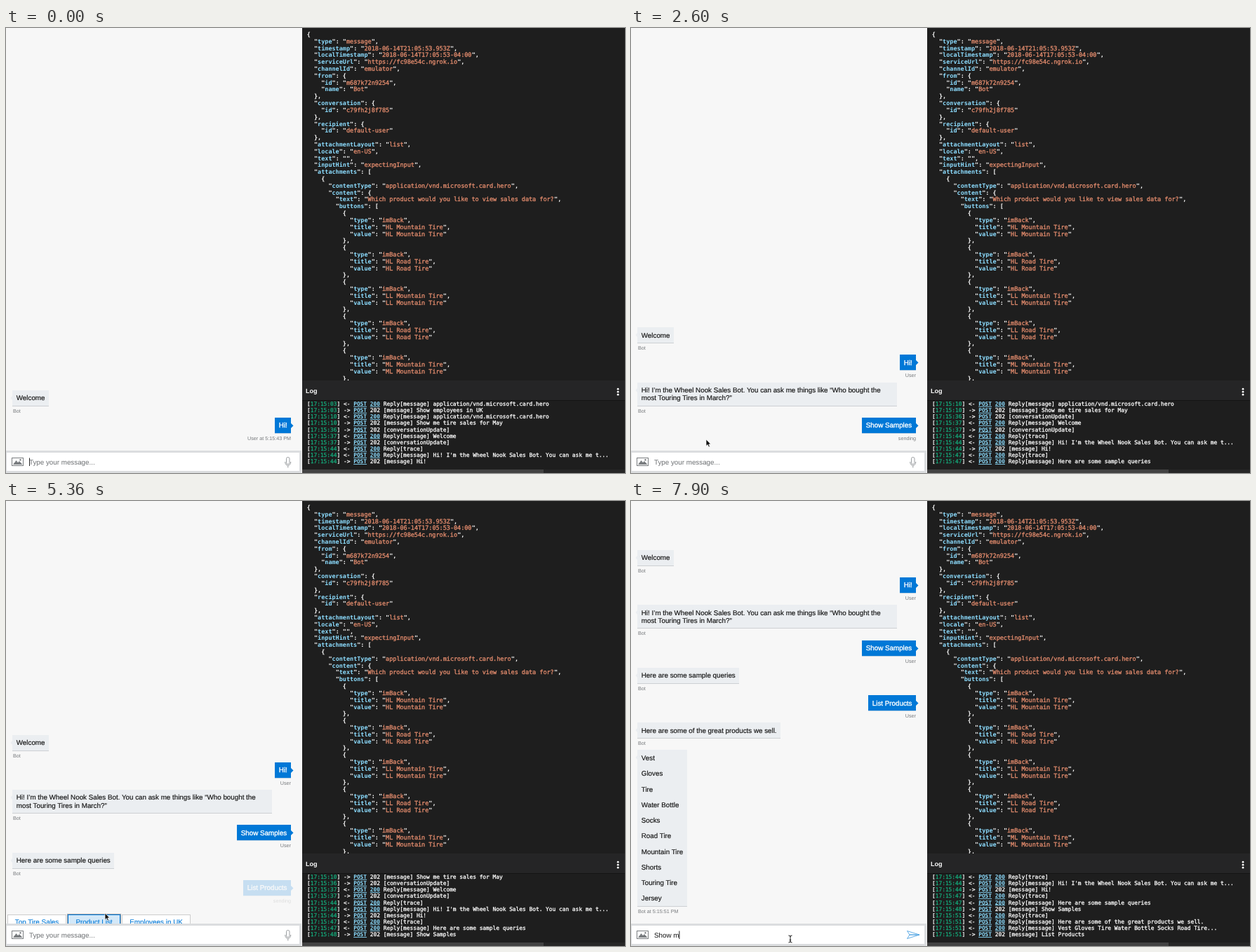
Write an HTML page with a canvas that moves like this. It is 882x635 px and loops after 8 s.

```html
<!DOCTYPE html>
<html lang="en">
<head>
<meta charset="utf-8">
<title>Bot chat</title>
<style>
html, body { margin: 0; width: 100%; height: 100%; overflow: hidden; background: #1e1e1e; }
canvas { display: block; width: 882px; height: 635px; }
</style>
</head>
<body>
<canvas id="stage"></canvas>
<script>
const W = 882, H = 635, LOOP = 8000;
const SANS = '"Liberation Sans", Arial, sans-serif';
const MONO = '"DejaVu Sans Mono", Menlo, monospace';
const BLUE = '#0078d7', PAPER = '#f7f7f7';
const canvas = document.getElementById('stage');
const ctx = canvas.getContext('2d');
const dpr = window.devicePixelRatio || 1;
canvas.width = W * dpr;
canvas.height = H * dpr;
ctx.textRendering = 'geometricPrecision';

const bursts = [
  [0, 0, 1], [120, 120, 1], [390, 500, 2], [650, 650, 1], [1130, 1840, 7], [1960, 2190, 3],
  [2340, 2450, 2], [2600, 2720, 2], [3200, 3440, 3], [3590, 3710, 2], [4060, 4770, 7],
  [4890, 5480, 6], [5630, 5740, 2], [5890, 6590, 7], [7070, 7310, 3], [7550, 7670, 2], [7900, 7900, 1]
];
const ticks = bursts.flatMap(([a, b, n]) =>
  Array.from({ length: n }, (_, i) => Math.round((a + (n > 1 ? (b - a) * i / (n - 1) : 0)) / 10) * 10));

const clamp = v => Math.max(0, Math.min(1, v));
const ease = p => p < 0.5 ? 2 * p * p : 1 - 2 * (1 - p) * (1 - p);
const ramp = (t, start, dur = 350) => clamp((t - start) / dur);

const products = ['Vest', 'Gloves', 'Tire', 'Water Bottle', 'Socks', 'Road Tire',
  'Mountain Tire', 'Shorts', 'Touring Tire', 'Jersey'];

const messages = [
  { who: 'Bot', lines: ['Welcome'], at: -1, fade: -999 },
  { who: 'User', lines: ['Hi!'], at: -1, fade: -999, stamp: '5:15:43 PM' },
  { who: 'Bot', at: 390, fade: 240, width: 370, stamp: '5:15:44 PM',
    lines: ['Hi! I’m the Wheel Nook Sales Bot. You can ask me things like “Who bought the',
      'most Touring Tires in March?”'] },
  { who: 'User', lines: ['Show Samples'], at: 1960, fade: 2059, sent: 2720, stamp: '5:15:47 PM' },
  { who: 'Bot', lines: ['Here are some sample queries'], at: 3200, fade: 3270, stamp: '5:15:47 PM' },
  { who: 'User', lines: ['List Products'], at: 5250, fade: 5290, sent: 6480, stamp: '5:15:51 PM' },
  { who: 'Bot', lines: ['Here are some of the great products we sell.'], at: 6120, fade: 6217 },
  { who: 'Bot', lines: products, gap: 22.28, at: 6120, fade: 6217, stamp: '5:15:51 PM' }
];

const log = [
  ['03', 'Reply[message] application/vnd.microsoft.card.hero'],
  ['03', '[message] Show employees in UK'],
  ['10', 'Reply[message] application/vnd.microsoft.card.hero'],
  ['10', '[message] Show me tire sales for May'],
  ['36', '[conversationUpdate]'],
  ['37', 'Reply[message] Welcome'],
  ['37', '[conversationUpdate]'],
  ['44', 'Reply[trace]'],
  ['44', "Reply[message] Hi! I'm the Wheel Nook Sales Bot. You can ask me t..."],
  ['44', '[message] Hi!'],
  ['47', 'Reply[trace]'],
  ['47', 'Reply[message] Here are some sample queries'],
  ['48', '[message] Show Samples'],
  ['51', 'Reply[trace]'],
  ['51', 'Reply[message] Here are some of the great products we sell.'],
  ['51', 'Reply[message] Vest Gloves Tire Water Bottle Socks Road Tire...'],
  ['51', '[message] List Products']
];

const imBack = name => ({ type: 'imBack', title: name, value: name });
const activity = {
  type: 'message',
  timestamp: '2018-06-14T21:05:53.953Z',
  localTimestamp: '2018-06-14T17:05:53-04:00',
  serviceUrl: 'https://fc98e54c.ngrok.io',
  channelId: 'emulator',
  from: { id: 'm687k72n9254', name: 'Bot' },
  conversation: { id: 'c79fh2j8f785' },
  recipient: { id: 'default-user' },
  attachmentLayout: 'list',
  locale: 'en-US',
  text: '',
  inputHint: 'expectingInput',
  attachments: [{
    contentType: 'application/vnd.microsoft.card.hero',
    content: {
      text: 'Which product would you like to view sales data for?',
      buttons: ['HL Mountain Tire', 'HL Road Tire', 'LL Mountain Tire', 'LL Road Tire',
        'ML Mountain Tire', 'ML Road Tire'].map(imBack)
    }
  }]
};
const jsonLines = JSON.stringify(activity, null, 2).split('\n').slice(0, 51);

// Last entry whose time has been reached
const latest = (list, t) => list.reduce((v, [at, val]) => t >= at ? val : v, list[0][1]);

// Fade a six-digit hex colour in from the chat background
function fadeIn(color, p) {
  const channels = c => [1, 3, 5].map(i => parseInt(c.slice(i, i + 2), 16));
  const from = channels(PAPER);
  return `rgb(${channels(color).map((v, i) => Math.round(from[i] + (v - from[i]) * p))})`;
}

function rect(x, y, w, h, color) {
  ctx.fillStyle = color;
  ctx.fillRect(x, y, w, h);
}

function text(str, x, y, size, color, { font = SANS, weight = '', align = 'left', thick = 0 } = {}) {
  const base = y + size * 0.355;
  ctx.font = `${weight} ${size}px ${font}`;
  ctx.textAlign = align;
  ctx.fillStyle = color;
  ctx.fillText(str, x, base);
  if (thick) {
    ctx.strokeStyle = color;
    ctx.lineWidth = thick;
    ctx.strokeText(str, x, base);
  }
}

function poly(points, fill, stroke, width = 1) {
  ctx.beginPath();
  points.forEach(([x, y]) => ctx.lineTo(x, y));
  ctx.closePath();
  if (fill) { ctx.fillStyle = fill; ctx.fill(); }
  if (stroke) { ctx.strokeStyle = stroke; ctx.lineWidth = width; ctx.stroke(); }
}

function clipped(x, y, w, h, draw) {
  ctx.save();
  ctx.beginPath();
  ctx.rect(x, y, w, h);
  ctx.clip();
  draw();
  ctx.restore();
}

function drawJson() {
  const cw = 5.105, size = 8.48;
  const put = (s, col, y, color, weight) =>
    text(s, 428.8 + col * cw, y, size, color, { font: MONO, weight, thick: weight ? 0 : 0.35 });
  jsonLines.forEach((line, i) => {
    const y = 9 + i * 9.81;
    for (const m of line.matchAll(/"([^"]*)"(:?)|[^"\s]+/g)) {
      if (m[1] === undefined) { put(m[0], m.index, y, '#fff', 'bold'); continue; }
      const end = m.index + m[1].length + 1;
      put('"', m.index, y, '#fff', 'bold');
      put(m[1], m.index + 1, y, m[2] ? '#8cdcfe' : '#e08a6c', m[2] ? 'bold' : '');
      put('"' + m[2], end, y, '#fff', 'bold');
    }
  });
}

function drawLog(t) {
  const cw = 4.726, size = 7.85;
  const count = latest([[0, 10], [2600, 12], [2720, 13], [6010, 14], [6120, 16], [6480, 17]], t);
  log.slice(count - 10, count).forEach(([sec, body], i) => {
    const y = 536.2 + i * 9.13, reply = body.startsWith('Reply');
    const put = (s, col, color, weight) =>
      text(s, 429 + col * cw, y, size, color, { font: MONO, weight, thick: weight ? 0 : 0.3 });
    const link = (s, col) => {
      put(s, col, '#8cdcfe', 'bold');
      rect(429 + col * cw, y + 3.6, s.length * cw, 0.9, '#8cdcfe');
    };
    put('[', 0, '#fff', 'bold');
    put('17:15:' + sec, 1, '#14a879');
    put(']', 9, '#fff', 'bold');
    put(reply ? '<-' : '->', 11, '#fff');
    link('POST', 14);
    if (reply) link('200', 19); else put('202', 19, '#fff');
    put(body, 23, '#fff');
  });
}

function drawPanel(t) {
  rect(422, 0, 460, H, '#1e1e1e');
  clipped(422, 0, 460, 503, drawJson);
  rect(422, 503, 460, 28, '#252526');
  text('Log', 427, 518, 9, '#fff', { weight: 'bold' });
  ctx.fillStyle = '#fff';
  for (const y of [515.2, 519.2, 523.2]) {
    ctx.beginPath();
    ctx.arc(872, y, 1.4, 0, 7);
    ctx.fill();
  }
  rect(422, 531, 460, 1, '#141414');
  clipped(422, 532, 460, 97, () => drawLog(t));
  rect(422, 630, 460, 5, '#262626');
  rect(422, 630, 344, 5, '#434343');
}

function drawMessage(m, y, t, last) {
  const user = m.who === 'User', size = 9.8, gap = m.gap || 11.3;
  const tone = color => fadeIn(color, ramp(t, m.fade));
  ctx.font = `${size}px ${SANS}`;
  const textWidth = Math.max(...m.lines.map(s => ctx.measureText(s).width));
  const w = Math.round(m.width || textWidth + 11.5);
  const h = Math.round(22 + (m.lines.length - 1) * gap);
  const x = user ? 406 - w : 9, top = Math.round(y - 11), mid = top + 11;
  const fill = tone(user ? BLUE : '#ebeef1');
  rect(x, top + 1, w, h, tone(user ? '#b9cfe2' : '#cdd0d3'));
  rect(x, top, w, h, fill);
  if (user) poly([[406, mid - 3], [409.5, mid + 0.5], [406, mid + 4]], fill);
  else poly([[9, mid - 3], [6.5, mid], [9, mid + 3]], fill);
  m.lines.forEach((s, i) => {
    text(s, x + 5.8, y + i * gap, size, tone(user ? '#ffffff' : '#111111'), { thick: user ? 0.35 : 0.15 });
  });
  const label = m.sent && t < m.sent ? 'sending'
    : last && m.stamp ? `${m.who} at ${m.stamp}` : m.who;
  text(label, user ? 406 : 10, top + h + 7, 7.2, tone('#76797c'), { align: user ? 'right' : 'left' });
}

function drawChat(t, lift) {
  rect(0, 0, 422, H, PAPER);
  const shown = messages.filter(m => t >= m.at);
  const heightOf = m => 39.2 + (m.lines.length - 1) * (m.gap || 11.3);
  const total = shown.reduce((sum, m) => sum + heightOf(m), 0);
  let y = 585 - lift - 18 + 39.2 - total;
  shown.forEach((m, i) => {
    drawMessage(m, y, t, i === shown.length - 1);
    y += heightOf(m);
  });
}

function button(label, x, w, y, { focus, hover, active }) {
  rect(x, y, w, 21, active ? '#d3e8f8' : '#fff');
  ctx.lineWidth = 1;
  ctx.strokeStyle = focus || hover ? BLUE : '#ccc';
  ctx.strokeRect(x + 0.5, y + 0.5, w - 1, 20);
  if (focus) {
    ctx.strokeStyle = '#3d4a58';
    ctx.setLineDash([1, 1]);
    ctx.strokeRect(x - 0.5, y - 0.5, w + 1, 22);
    ctx.setLineDash([]);
  }
  text(label, x + w / 2, y + 10.5, 9.9, BLUE, { align: 'center', thick: 0.1 });
}

function drawActions(t, lift, mouse) {
  if (lift < 0.2) return;
  const y = Math.round(579 + 26 - lift);
  const first = t < 2600;
  const items = first ? [['Show Sample Queries', 2, 119]]
    : [['Top Tire Sales', 2, 84], ['Product List', 88, 75], ['Employees in UK', 165, 98]];
  const focus = first ? (t >= 1960 ? 0 : -1) : (t >= 5130 ? 1 : 0);
  const pressed = t >= 1960 && first || t >= 5130;
  clipped(0, 570, 421, 33, () => items.forEach(([label, x, w], i) => {
    const hover = mouse && mouse.hand && mouse.x >= x && mouse.x <= x + w;
    button(label, x, w, y, { focus: i === focus, hover, active: pressed && i === focus });
  }));
}

function drawInput(t) {
  rect(0, 603, 421, 32, '#dbdddf');
  rect(1, 606, 417, 26, '#fff');
  // picture icon
  ctx.strokeStyle = '#7a7d80';
  ctx.lineWidth = 1;
  ctx.strokeRect(8.5, 613.5, 16, 11);
  poly([[10, 623], [14.5, 617], [17, 620], [19, 618], [23.5, 623]], '#7a7d80');
  ctx.beginPath();
  ctx.arc(20.5, 616.3, 1.2, 0, 7);
  ctx.fill();

  const typed = latest([[0, ''], [7190, 'S'], [7310, 'Sh'], [7550, 'Sho'], [7670, 'Show '], [7900, 'Show m']], t);
  text(typed || 'Type your message...', 33, 619.3, 9.8, typed ? '#111' : '#6b6e71');
  const caret = latest([[0, 1], [120, 0], [650, 1], [1130, 0], [1600, 1], [1960, 0], [7070, 1]], t);
  if (caret) rect(33 + (typed ? ctx.measureText(typed).width : 0), 613.5, 1, 11.5, '#222');

  if (typed) {
    const tip = [411, 619];
    poly([[393.5, 613.5], tip, [393.5, 624.5], [397, 619]], null, '#4fa3e3', 0.9);
    poly([[397, 619], tip], null, '#4fa3e3', 0.9);
  } else {
    ctx.strokeStyle = '#9a9da0';
    ctx.lineWidth = 1;
    ctx.beginPath();
    ctx.roundRect(399.5, 612.5, 4.5, 10, 2.2);
    ctx.moveTo(397.7, 619);
    ctx.bezierCurveTo(397.7, 626, 405.8, 626, 405.8, 619);
    ctx.moveTo(401.8, 624.5);
    ctx.lineTo(401.8, 627.5);
    ctx.stroke();
  }
}

// Pointer legs: [start, end, x, y]
const legs = [[1130, 1840, 107, 587], [2600, 2720, 111, 583], [4060, 4770, 191, 592],
  [4890, 5130, 141, 588], [5890, 6240, 227, 625]];

function mouseAt(t) {
  if (t < 1130) return null;
  let x = 703, y = 465;
  for (const [a, b, tx, ty] of legs) {
    const p = ease(ramp(t, a, b - a));
    x += (tx - x) * p;
    y += (ty - y) * p;
  }
  const hand = t >= 1840 && t < 2080 || t >= 4060 && t < 5250;
  return { x, y, hand, beam: x < 418 && y > 605 };
}

function drawMouse(m) {
  if (!m) return;
  ctx.save();
  ctx.translate(m.x, m.y);
  ctx.lineJoin = 'round';
  if (m.beam) {
    ctx.strokeStyle = '#111';
    ctx.lineWidth = 1;
    ctx.beginPath();
    for (const s of [-1, 1]) {
      ctx.moveTo(-2.5, 5 * s);
      ctx.quadraticCurveTo(0, 5 * s, 0, 3.5 * s);
      ctx.quadraticCurveTo(0, 5 * s, 2.5, 5 * s);
    }
    ctx.moveTo(0, -4);
    ctx.lineTo(0, 4);
    ctx.moveTo(-1.2, 1.5);
    ctx.lineTo(1.2, 1.5);
    ctx.stroke();
  } else if (m.hand) {
    poly([[-1, 0.5], [0, 0], [1, 0.5], [1.2, 4], [4, 4.5], [5.5, 5.5], [5.2, 9], [4, 11.5],
      [-0.5, 11.5], [-3.5, 7.5], [-3, 6.3], [-1, 7.3]], '#fff', '#111', 1);
  } else {
    poly([[0, 0], [0, 9.5], [2.2, 7.6], [3.8, 11], [5.4, 10.3], [3.9, 7], [6.6, 6.8]], '#111', '#fff', 0.7);
  }
  ctx.restore();
}

function draw(t) {
  const slide = start => ease(ramp(t, start));
  const lift = 26 * (slide(150) - slide(1943) + slide(3160) - slide(5200));
  const mouse = mouseAt(t);
  ctx.setTransform(dpr, 0, 0, dpr, 0, 0);
  drawChat(t, lift);
  drawActions(t, lift, mouse);
  drawInput(t);
  drawPanel(t);
  drawMouse(mouse);
}

let shownTick = -1;
function loop() {
  const t = performance.now() % LOOP;
  const tick = ticks.reduce((v, at) => t >= at ? at : v, 0);
  if (tick !== shownTick) draw(shownTick = tick);
  requestAnimationFrame(loop);
}
loop();
</script>
</body>
</html>
```
